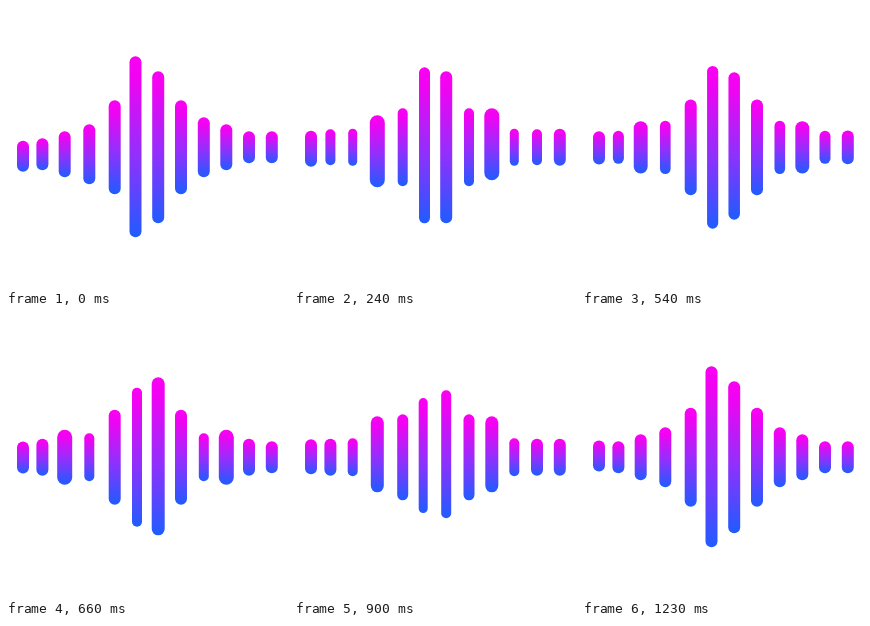
An HTML page with a canvas for the animation above (1.26 s loop, 282 by 282 pixels).

```html
<!DOCTYPE html>
<html lang="en">
<head>
<meta charset="utf-8">
<title>Sound bars</title>
<style>
  html, body { margin: 0; width: 100%; height: 100%; overflow: hidden; background: #fff; }
  canvas { display: block; width: 282px; height: 282px; }
</style>
</head>
<body>
<canvas id="stage" width="282" height="282"></canvas>
<script>
const ctx = document.getElementById('stage').getContext('2d');
const LOOP = 1260, STEP = 30, MIDDLE = 141.3;
const times = [0, 240, 420, 660, 900, 1110, 1230];

// Bars at the same distance from the middle share one pulse.
const edgeLeft = { h: [31, 36, 35, 32, 35, 33, 31], w: 12 };
const edgeRight = { h: [32, 37, 36, 32, 37, 32, 32], w: 12 };
const tiny = { h: [32, 36, 29, 37, 37, 20, 32], w: [12, 10, 10, 12, 12, 7, 12] };
const small = { h: [46, 37, 47, 55, 38, 44, 46], w: [12, 9, 12, 15, 10, 12, 12] };
const medium = {
  h: [60, 72, 62, 48, 76, 73, 60], w: [12, 15, 12, 10, 13, 12.5, 12],
  dy: [0, -3, 0, 0, -3, -2.5, 0]
};
const large = { h: [94, 78, 96, 95, 86, 96, 99], w: [12, 10, 12, 12, 11, 12, 12] };
const tallLeft = {
  h: [181, 156, 179, 139, 115, 151, 181], w: [12, 11, 12, 10, 9, 12, 12],
  dx: [0, 1, 0.8, 1.5, -0.3, -0.3, 0], dy: [-0.5, -2, 0, 0, -1.7, -1.5, -0.5]
};
const tallRight = {
  h: [152, 152, 137, 158, 128, 149, 152], w: [12, 12, 10, 13, 10, 12, 12],
  dy: [0, 0, -1.7, -1, -3, -1.7, 0]
};

// Each of the first four bars starts low and rises into line.
const rise = (t, from, to) => 7 * (1 - Math.min(1, Math.max(0, (t - from) / (to - from))));
const early = t => rise(t, 0, 210);
const bars = [
  { x: 17, pulse: edgeLeft, shift: t => early(t) + 2 - 3.5 * t / LOOP },
  { x: 36.4, pulse: tiny, shift: early },
  { x: 58.7, pulse: small, shift: early },
  { x: 83.3, pulse: medium, shift: t => rise(t, 240, 420) },
  { x: 108.7, pulse: large },
  { x: 129.5, pulse: tallLeft },
  { x: 152.2, pulse: tallRight },
  { x: 175, pulse: large },
  { x: 197.8, pulse: medium },
  { x: 220.3, pulse: small },
  { x: 243, pulse: tiny },
  { x: 265.8, pulse: edgeRight }
];

function slope(values, i) {
  if (i === 0 || i === times.length - 1) return 0;
  const before = (values[i] - values[i - 1]) / (times[i] - times[i - 1]);
  const after = (values[i + 1] - values[i]) / (times[i + 1] - times[i]);
  return before * after > 0 ? 2 * before * after / (before + after) : 0;
}

// Monotone cubic through the key poses: smooth, never overshooting.
function valueAt(track, t) {
  if (!Array.isArray(track)) return track || 0;
  const last = times.length - 1;
  if (t >= times[last]) return track[last];
  const i = times.findIndex(time => time > t) - 1;
  const span = times[i + 1] - times[i];
  const s = (t - times[i]) / span;
  const ease = s * s * (3 - 2 * s);
  return track[i] + (track[i + 1] - track[i]) * ease
    + span * s * (1 - s) * (slope(track, i) * (1 - s) - slope(track, i + 1) * s);
}

function drawBar({ x, pulse, shift }, t) {
  const w = valueAt(pulse.w, t), h = valueAt(pulse.h, t);
  const cx = x + valueAt(pulse.dx, t);
  const cy = MIDDLE + valueAt(pulse.dy, t) + (shift ? shift(t) : 0);
  const top = cy - h / 2;
  const fill = ctx.createLinearGradient(0, top, 0, top + h);
  fill.addColorStop(0, '#fb00f2');
  fill.addColorStop(0.12, '#f003f2');
  fill.addColorStop(0.55, '#9030fc');
  fill.addColorStop(1, '#1f5cff');
  ctx.fillStyle = fill;
  ctx.beginPath();
  ctx.roundRect(cx - w / 2, top, w, h, w / 2);
  ctx.fill();
}

function draw(now) {
  const t = Math.floor((now % LOOP) / STEP) * STEP;
  ctx.fillStyle = '#fff';
  ctx.fillRect(0, 0, 282, 282);
  bars.forEach(bar => drawBar(bar, t));
}

let start;
function tick(now) {
  start ??= now;
  draw(now - start);
  requestAnimationFrame(tick);
}
draw(0);
requestAnimationFrame(tick);
</script>
</body>
</html>
```
